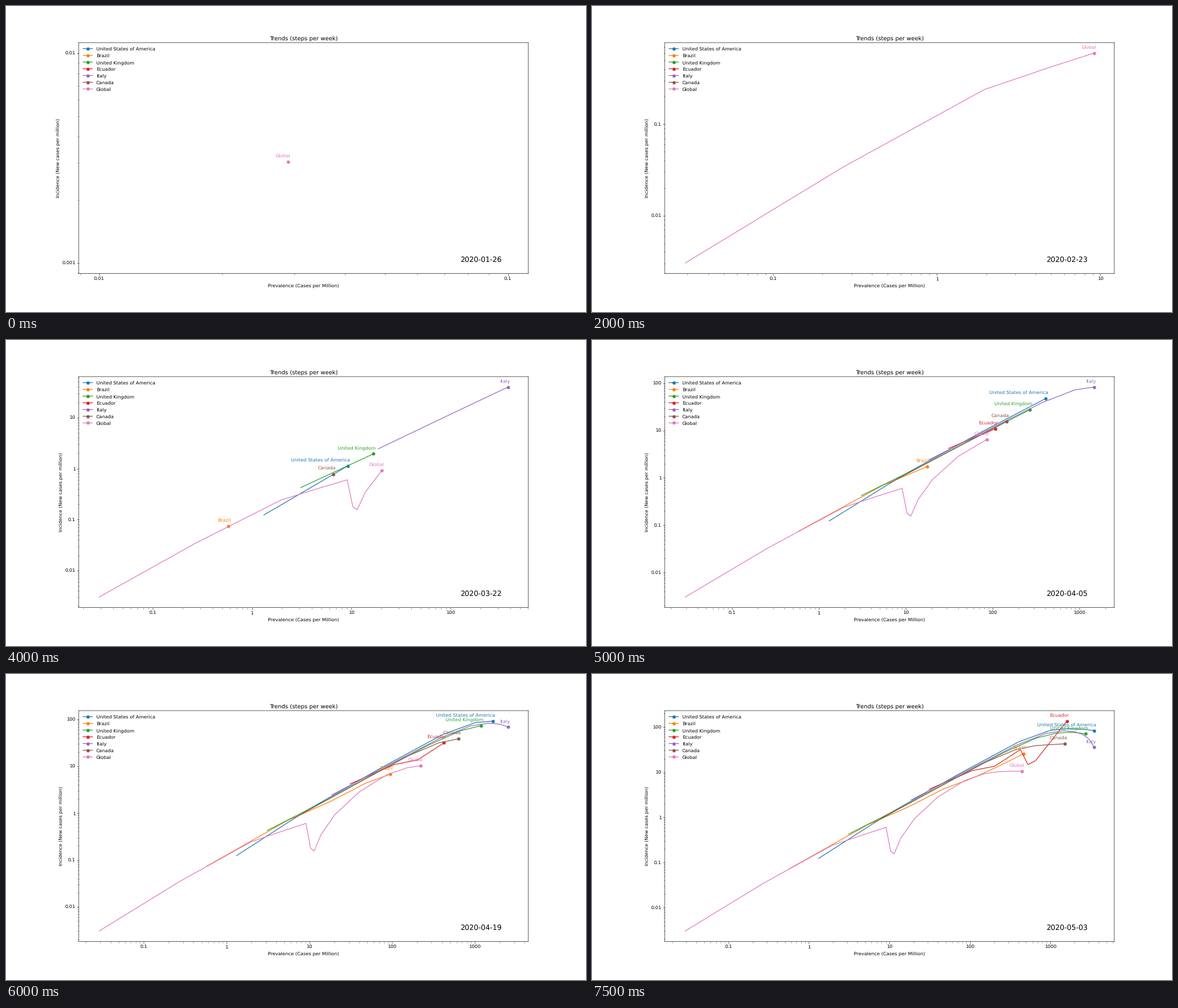
Recreate the animation shown at these times as a matplotlib script. Size 1028x544 px, loop 10000 ms.

```python
import numpy as np
import matplotlib.pyplot as plt
from matplotlib.animation import FuncAnimation
from matplotlib.ticker import FuncFormatter, NullFormatter

STEPS, HOLD = 16, 4          # weekly steps, then extra ticks on the last one
START = np.datetime64("2020-01-26")

plt.rcParams.update({"path.snap": False, "text.hinting": "none"})


def wave(peak, mid, growth, fade):
    """Outbreak: logistic rise around week mid, then a slow bell-shaped fade."""
    def rate(week):
        u = week - mid
        return peak * np.exp(-fade * u**2) / (1 + np.exp(-growth * u))
    return rate


def keyed(weeks, rates):
    """Daily rate that grows or shrinks evenly between key weeks."""
    return lambda week: np.exp(np.interp(week, weeks, np.log(rates)))


first_wave = keyed(range(8), [0.00303, 0.034, 0.24, 0.42, 0.6, 0.17, 0.115, 0.17])
second_wave = wave(10.4, 9.7, 1.5, 0)

# name: (first week, prevalence in that week, incidence by week)
TRENDS = {
    "United States of America": (7, 1.32, wave(95, 10, 2.2, 0.005)),
    "Brazil": (8, 0.578, keyed([8, 9, 11, 15], [0.0737, 0.69, 4.35, 25.9])),
    "United Kingdom": (7, 3.1, wave(82, 10.45, 1.5, 0.007)),
    "Ecuador": (9, 31.1, keyed(range(9, 16),
                               [4.2, 10.9, 13.6, 31.7, 14.8, 18, 136])),
    "Italy": (6, 18.7, wave(94, 8.2, 1.6, 0.021)),
    "Canada": (8, 6.58, wave(40, 10.25, 1.75, -0.003)),
    "Global": (0, 0.029, lambda week: first_wave(week) + second_wave(week)),
}

fig = plt.figure(figsize=(17, 9), dpi=60.471, facecolor="white")
fig.subplots_adjust(left=0.1254, right=0.9006, bottom=0.1257, top=0.88)
ax = fig.add_subplot()


def trend(name, step):
    """Prevalence and incidence per million for each week up to a step."""
    first, total, rate = TRENDS[name]
    incidence = rate(np.arange(first, step + 1))
    prevalence = total + 7 * (np.cumsum(incidence) - incidence[:1])
    return prevalence, incidence


def style_axes():
    ax.set_xscale("log")
    ax.set_yscale("log")
    for axis in (ax.xaxis, ax.yaxis):
        axis.set_major_formatter(FuncFormatter(lambda v, _: f"{v:g}"))
        axis.set_minor_formatter(NullFormatter())
    ax.set_title("Trends (steps per week)", pad=5)
    ax.set_xlabel("Prevalence (Cases per Million)")
    ax.set_ylabel("Incidence (New cases per million)")


def draw(tick):
    step = min(tick, STEPS - 1)
    ax.clear()
    style_axes()
    for i, name in enumerate(TRENDS):
        started = step >= TRENDS[name][0]
        x, y = trend(name, step) if started else ([], [])
        ax.plot(x, y, "-o", color=f"C{i}", label=name,
                markevery=slice(-1, None))
        if started:
            ax.annotate(name, (x[-1], y[-1]), xytext=(5, 10),
                        textcoords="offset points", ha="right", color=f"C{i}")
    date = START + 7 * min(step, STEPS - 2)
    ax.text(0.848, 0.05, str(date), fontsize=15, transform=ax.transAxes)
    ax.legend(loc="upper left", frameon=False)


anim = FuncAnimation(fig, draw, frames=STEPS + HOLD, interval=500,
                     repeat=True, repeat_delay=0)
plt.show()
```
